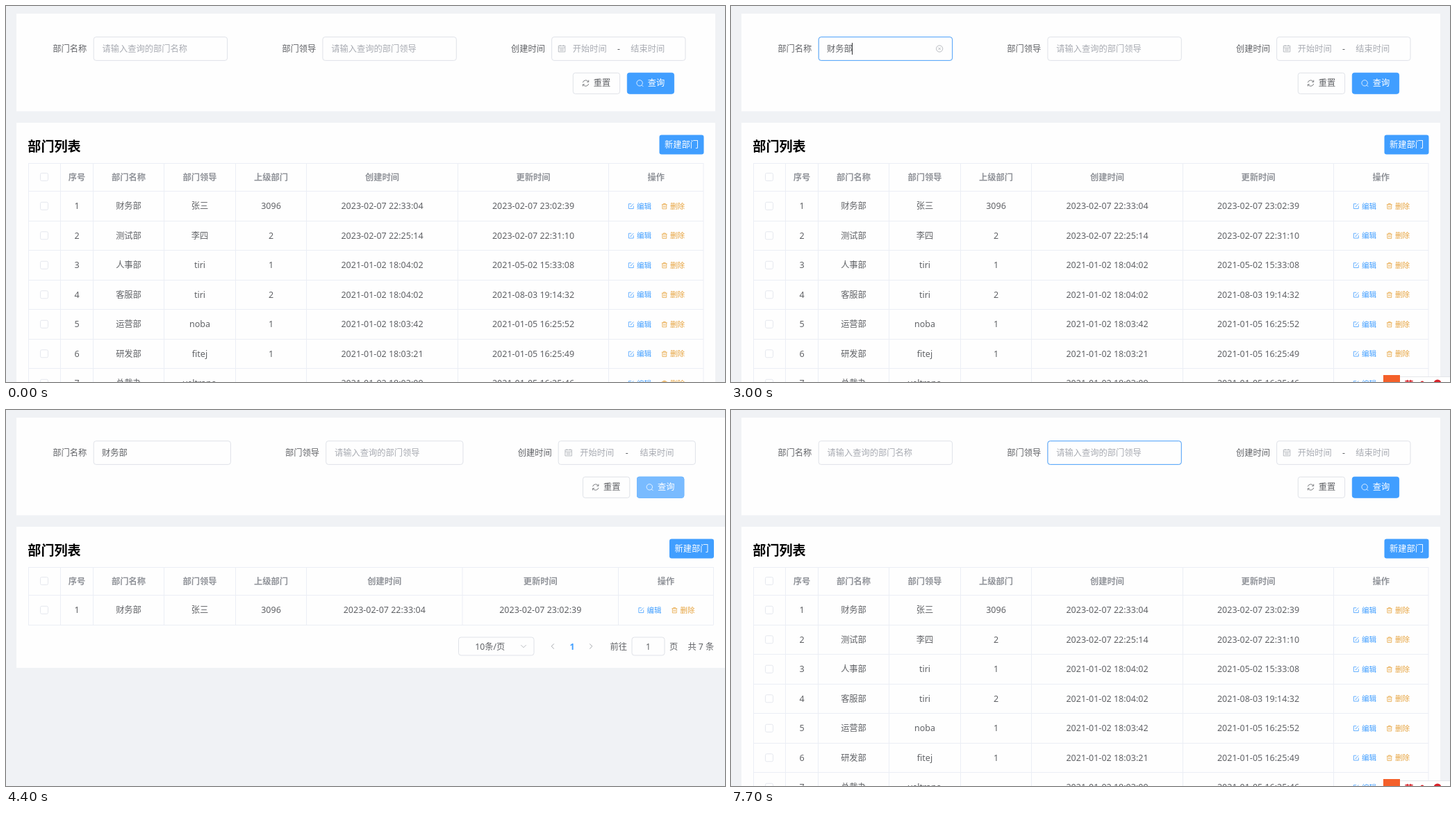
An HTML page for the animation above (8000 ms loop, 1035 by 541 pixels).

```html
<!DOCTYPE html>
<html lang="zh-CN">
<head>
<meta charset="utf-8">
<title>部门列表</title>
<style>
  html, body { margin: 0; width: 100%; height: 100%; overflow: hidden; background: #f0f2f5; }
  svg { display: block; width: 1035px; height: 541px; }
  text { font: 12.25px "Noto Sans", "Noto Sans CJK SC", "Noto Sans CJK", sans-serif; white-space: pre; }
</style>
</head>
<body>
<svg id="stage" viewBox="0 0 1035 541"></svg>
<script>
const LOOP = 8000;
const BLUE = '#409eff', LIGHT = '#79bbff', DARK = '#337ecc', ORANGE = '#e6a23c';
const BODY = '#606266', HEAD = '#909399', HINT = '#a8abb2';
const EDGE = '#dcdfe6', EDGE_HOVER = '#c0c4cc', GRID = '#ebeef5', PAPER = '#fefefe';

const ICONS = {
  refresh: 'M1 4.2A4.2 4.2 0 0 1 8.8 3.2M9 .8V3.3H6.5M9 5.8A4.2 4.2 0 0 1 1.2 6.8M1 9.2V6.7H3.5',
  search: 'M8.6 4.8A4 4 0 1 1 .6 4.8A4 4 0 1 1 8.6 4.8M7.5 7.7L9.6 9.8',
  calendar: 'M.5 1.2H9.5V9.5H.5ZM.5 3.8H9.5M2.8 0V2M7.2 0V2M2.3 5.6H7.7M2.3 7.5H7.7',
  edit: 'M5.5 1H1V9H9V4.5M4 6L9.2 .8M4 6L5.5 5.7',
  trash: 'M.5 2.2H9.5M3.3 2V.7H6.7V2M1.6 2.4V9.4H8.4V2.4M3.9 4.3V7.3M6.1 4.3V7.3',
  clear: 'M9.5 5A4.5 4.5 0 1 1 .5 5A4.5 4.5 0 1 1 9.5 5M3.3 3.3L6.7 6.7M6.7 3.3L3.3 6.7',
  down: 'M1 3L5 7L9 3', left: 'M7 1L3 5L7 9', right: 'M3 1L7 5L3 9'
};

const HEADERS = ['', '序号', '部门名称', '部门领导', '上级部门', '创建时间', '更新时间', '操作'];
const ROWS = [
  ['财务部', '张三', '3096', '2023-02-07 22:33:04', '2023-02-07 23:02:39'],
  ['测试部', '李四', '2', '2023-02-07 22:25:14', '2023-02-07 22:31:10'],
  ['人事部', 'tiri', '1', '2021-01-02 18:04:02', '2021-05-02 15:33:08'],
  ['客服部', 'tiri', '2', '2021-01-02 18:04:02', '2021-08-03 19:14:32'],
  ['运营部', 'noba', '1', '2021-01-02 18:03:42', '2021-01-05 16:25:52'],
  ['研发部', 'fitej', '1', '2021-01-02 18:03:21', '2021-01-05 16:25:49'],
  ['总裁办', 'veltrano', '', '2021-01-02 18:03:09', '2021-01-05 16:25:46']
];

const stage = document.getElementById('stage');
const timed = [];

function add(parent, tag, attrs = {}) {
  const el = document.createElementNS('http://www.w3.org/2000/svg', tag);
  for (const key in attrs) el.setAttribute(key, attrs[key]);
  return parent.appendChild(el);
}
// Group visible only inside the spans [start, end, opacity].
function during(parent, ...spans) {
  const el = add(parent, 'g');
  timed.push({ el, spans });
  return el;
}
function box(parent, x, y, width, height, fill, stroke = 'none', rx = 0) {
  return add(parent, 'rect', { x, y, width, height, fill, stroke, rx, 'stroke-width': .9 });
}
function label(parent, str, x, cy, { fill = BODY, size = 12.25, anchor = 'start', weight = 400 } = {}) {
  const el = add(parent, 'text', { x, y: cy + size * .37, fill, 'text-anchor': anchor });
  el.style.fontSize = size + 'px';
  el.style.fontWeight = weight;
  el.textContent = str;
}
function icon(parent, name, x, y, size, stroke) {
  add(parent, 'path', {
    d: ICONS[name], transform: `translate(${x} ${y}) scale(${size / 10})`,
    fill: 'none', stroke, 'vector-effect': 'non-scaling-stroke', 'stroke-width': .8
  });
}
function fieldEdge(parent, x, width, stroke) {
  box(parent, x, 44.6, width, 33.8, 'none', stroke, 3.5);
}
function caret(parent, x) {
  box(parent, x, 53, 1, 17, '#303133');
}
function button(parent, x, name, str, fill, edge, ink) {
  box(parent, x + .5, 96.3, 67.3, 30, fill, edge, 3.2);
  icon(parent, name, x + 13.5, 105.8, 10.5, ink);
  label(parent, str, x + 30, 110.5, { fill: ink });
}
const resetButton = (parent, x, fill = PAPER, edge = EDGE, ink = BODY) =>
  button(parent, x, 'refresh', '重置', fill, edge, ink);
const queryButton = (parent, x, fill = BLUE) =>
  button(parent, x, 'search', '查询', fill, fill, '#fff');

function searchForm(parent, fields, width, labels, date, buttons) {
  ['部门名称', '部门领导', '创建时间'].forEach((str, i) => {
    label(parent, str, labels[i], 61.5);
    fieldEdge(parent, fields[i], width, EDGE);
  });
  label(parent, '请输入查询的部门领导', fields[1] + 12.3, 61.5, { fill: HINT });
  icon(parent, 'calendar', fields[2] + 9.2, 56, 10.5, HINT);
  label(parent, '开始时间', date[0], 61.5, { fill: HINT, anchor: 'middle' });
  label(parent, '-', date[1], 61.5, { anchor: 'middle' });
  label(parent, '结束时间', date[2], 61.5, { fill: HINT, anchor: 'middle' });
  resetButton(parent, buttons);
  queryButton(parent, buttons + 78);
}

function checkbox(parent, cy) {
  box(parent, 49.5, cy - 5.5, 11, 11, '#fff', '#e3e6ec', 2);
}
function table(parent, rows, lines) {
  const right = lines[lines.length - 1];
  const rowTop = i => 266.5 + i * 42.5;
  const bottom = rowTop(rows.length);
  const center = i => (lines[i] + lines[i + 1]) / 2;
  const middle = { anchor: 'middle' };
  const rule = d => add(parent, 'path', { d, stroke: GRID, fill: 'none' });

  label(parent, '部门列表', 31.3, 202.3, { fill: '#000', size: 19.1, weight: 700 });
  box(parent, right - 63.5, 185.6, 64, 27.8, BLUE, 'none', 3.2);
  label(parent, '新建部门', right - 31.5, 199.5, { fill: '#fff', ...middle });

  rule(`M32 226.5H${right}`);
  lines.forEach(x => rule(`M${x} 226V${bottom}`));
  checkbox(parent, 246);
  HEADERS.forEach((str, i) => label(parent, str, center(i), 246.5, { fill: HEAD, weight: 700, ...middle }));

  rule(`M32 266.5H${right}`);
  rows.forEach((row, i) => {
    const cy = rowTop(i) + 21.3;
    rule(`M32 ${Math.floor(rowTop(i + 1)) + .5}H${right}`);
    checkbox(parent, cy);
    [String(i + 1), ...row].forEach((str, col) => {
      const size = /^[\x00-\x7f]*$/.test(str) ? 12.5 : 12.25;
      label(parent, str, center(col + 1), cy, { size, ...middle });
    });
    const ops = right - 108.5;
    icon(parent, 'edit', ops, cy - 4, 8.6, BLUE);
    label(parent, '编辑', ops + 12.5, cy + .2, { fill: BLUE, size: 10.5 });
    icon(parent, 'trash', ops + 48, cy - 4, 8.6, ORANGE);
    label(parent, '删除', ops + 60.5, cy + .2, { fill: ORANGE, size: 10.5 });
  });
}

function pagination(parent) {
  const cy = 340, middle = { anchor: 'middle' };
  box(parent, 651.5, 327, 108.5, 26, PAPER, EDGE, 3.5);
  label(parent, '10条/页', 696.7, cy, middle);
  icon(parent, 'down', 740.5, cy - 4.5, 9, HINT);
  icon(parent, 'left', 782.5, cy - 4.5, 9, HEAD);
  label(parent, '1', 815, cy, { fill: BLUE, weight: 700, ...middle });
  icon(parent, 'right', 837.5, cy - 4.5, 9, HEAD);
  label(parent, '前往', 869.5, cy);
  box(parent, 901, 327, 47, 26, PAPER, EDGE, 3.5);
  label(parent, '1', 924.5, cy, middle);
  label(parent, '页', 955, cy);
  label(parent, '共 7 条', 1019.3, cy, { anchor: 'end' });
}

// Full list
const full = during(stage, [0, 4400], [6100, LOOP]);
box(full, 15, 11, 1006, 140.5, PAPER);
box(full, 15, 168, 1006, 373, PAPER);
searchForm(full, [126.2, 455.9, 785.6], 192.4, [67.3, 397.2, 727], [840.3, 882, 923.8], 815.8);
table(full, ROWS, [32.5, 78.5, 125.5, 227.5, 330.5, 432.5, 650.5, 867.5, 1004]);

const NAME_HINT = '请输入查询的部门名称';
label(during(full, [0, 2900], [6100, LOOP]), NAME_HINT, 138.5, 61.5, { fill: HINT });
label(during(full, [2900, 4400]), '财务部', 138, 61.5);
fieldEdge(during(full, [2200, 2500, .8]), 126.2, 192.4, EDGE_HOVER);
fieldEdge(during(full, [2400, 2500, .6], [2500, 4100], [4100, 4200, .4]), 126.2, 192.4, BLUE);
caret(during(full, [2400, 2900]), 138);
caret(during(full, [2900, 3400], [3900, 4100]), 174);
icon(during(full, [3000, 3300], [3300, 3400, .4]), 'clear', 295, 56.3, 10.3, HINT);
fieldEdge(during(full, [3300, 3400, .5], [3400, 3700, .8]), 785.6, 192.4, EDGE_HOVER);
queryButton(during(full, [3700, 4100], [4200, 4400]), 893.8, LIGHT);
queryButton(during(full, [4100, 4200]), 893.8, DARK);
resetButton(during(full, [6100, 7200], [7200, 7300, .4]), 815.8, '#ecf5ff', '#c6e2ff', BLUE);
fieldEdge(during(full, [7100, 7300, .8]), 455.9, 192.4, EDGE_HOVER);
fieldEdge(during(full, [7200, 7300, .6], [7300, LOOP]), 455.9, 192.4, BLUE);
caret(during(full, [7200, 7700]), 468);

// Text selection and the pop-up badge beside it
const select = (str, width, ...span) => {
  const g = during(full, span);
  box(g, 158, 278, width, 20, '#338fff');
  label(g, str, 158.1, 287.8, { fill: '#fff' });
};
select('财务', 24.5, 900, 1000);
select('财务部', 37, 1000, 2400);
const badge = add(during(full, [1300, 2400], [2400, 2500, .4]), 'circle',
  { cx: 229.8, cy: 260.5, r: 12.3, fill: '#2b93b2' });

// Filtered list
const filtered = during(stage, [4400, 6100]);
box(filtered, 15, 11, 1020, 140.5, PAPER);
box(filtered, 15, 168, 1020, 203, PAPER);
searchForm(filtered, [126.2, 460.7, 795.2], 197.2, [67.3, 402, 736.7], [850.8, 893.8, 937], 830);
table(filtered, ROWS.slice(0, 1), [32.5, 78.5, 125.5, 227.5, 330.5, 432.5, 657, 881.5, 1018.5]);
pagination(filtered);
label(during(filtered, [4400, 6000]), '财务部', 138, 61.5);
label(during(filtered, [6000, 6100]), NAME_HINT, 138.5, 61.5, { fill: HINT });
queryButton(during(filtered, [4400, 5900], [5900, 6000, .5]), 908, LIGHT);
resetButton(during(filtered, [5300, 5900]), 830, '#ecf5ff', '#c6e2ff', BLUE);
resetButton(during(filtered, [5900, 6100]), 830, '#ecf5ff', BLUE, BLUE);

// Input method bar at the bottom edge
const inputBar = during(stage, [2500, 4100], [7300, LOOP]);
box(inputBar, 942.5, 533.5, 110, 30, '#fff', '#e3e5e8', 4);
add(inputBar, 'rect', { x: 939, y: 531, width: 24, height: 24, fill: '#f4602a' });
label(inputBar, '英', 969.5, 544.5, { fill: '#d8232a', size: 13, weight: 700 });
add(inputBar, 'circle', { cx: 995, cy: 542, r: 2.5, fill: '#d8232a' });
add(inputBar, 'circle', { cx: 1017, cy: 543, r: 5.5, fill: '#d8232a' });

function draw(now) {
  const t = now % LOOP;
  for (const { el, spans } of timed) {
    const span = spans.find(([start, end]) => t >= start && t < end);
    el.style.display = span ? '' : 'none';
    if (span) el.style.opacity = span[2] ?? 1;
  }
  const p = Math.min(1, Math.max(0, (Math.floor(t / 100) * 100 - 1200) / 800));
  const wobble = 1 - .25 * Math.cos(p * 4 * Math.PI) * (1 - p) ** 2;
  badge.setAttribute('r', 12.3 * wobble);
  badge.setAttribute('opacity', Math.min(1, p * 2));
}
const origin = performance.now();
(function frame() {
  draw(performance.now() - origin);
  requestAnimationFrame(frame);
})();
</script>
</body>
</html>
```
